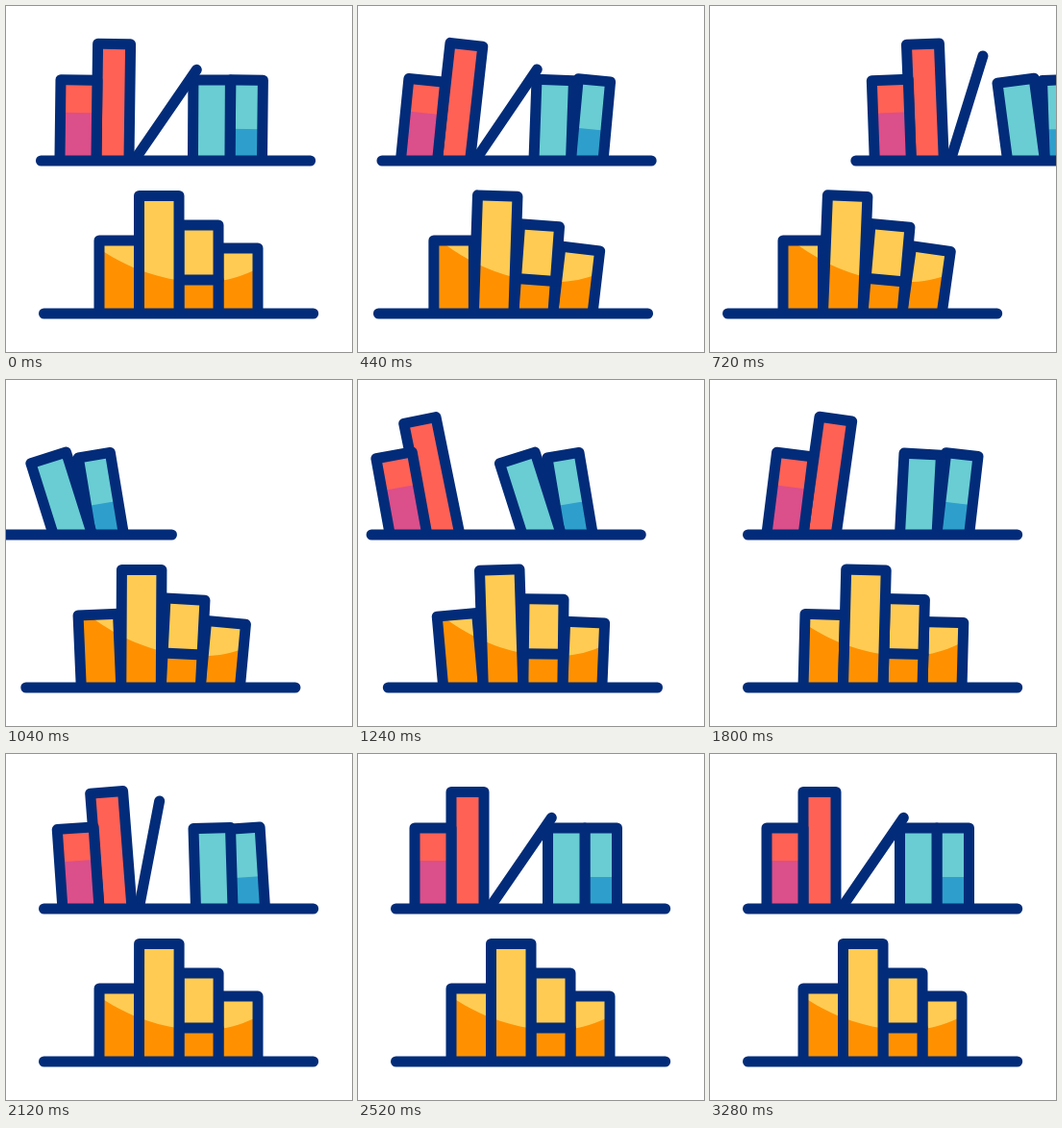
Animation of 360 by 360 pixels, one loop 3.72 s. Source, as an HTML page:

```html
<!DOCTYPE html>
<html lang="en">
<head>
<meta charset="utf-8">
<title>Bookshelves</title>
<style>
  html, body { margin: 0; width: 100%; height: 100%; overflow: hidden; background: #fff; }
  svg { display: block; width: 100%; height: 100%; }
</style>
</head>
<body>
<svg id="stage" viewBox="0 0 360 360"></svg>
<script>
const LOOP = 3720, STEP = 40, STOP = 1480;
const NAVY = '#022c79', RED = '#ff6155', PINK = '#db4f8a', TEAL = '#69cdd3',
      BLUE = '#2e9fcc', YELLOW = '#ffcb52', ORANGE = '#ff9100';
const SHADE = 'M60 222 L88 246 C110 263 150 286 200 287 C225 288 245 283 272 268 V340 H60 Z';

const stage = document.getElementById('stage');

function add(parent, tag, attrs = {}) {
  const node = document.createElementNS('http://www.w3.org/2000/svg', tag);
  for (const key in attrs) node.setAttribute(key, attrs[key]);
  return parent.appendChild(node);
}

// Progress from 0 to 1 between two times, and its sine-eased form.
const progress = (t, from, to) => Math.min(1, Math.max(0, (t - from) / (to - from)));
const ease = (t, from, to) => (1 - Math.cos(Math.PI * progress(t, from, to))) / 2;
const mix = (a, b, u) => a + (b - a) * u;

function makeShelf(name, base) {
  const group = add(stage, 'g', { fill: 'none', stroke: NAVY, 'stroke-width': 11,
    'stroke-linecap': 'round', 'stroke-linejoin': 'round' });
  const clip = add(group, 'clipPath', { id: name });
  add(clip, 'rect', { x: -400, y: 0, width: 1200, height: base });
  const books = add(group, 'g', { 'clip-path': `url(#${name})` });
  add(group, 'path', { d: `M39.5 ${base}H319.7` });
  return { name, base, group, books };
}

// A book tilts around the middle of its foot; whatever dips below the shelf is clipped.
function makeBook(shelf, { left, right, top, fill, shade, shadeTop, band, tilt }) {
  const box = { x: left, y: top, width: right - left, height: shelf.base - top + 30 };
  const body = add(shelf.books, 'g', { stroke: 'none' });
  add(body, 'rect', { ...box, fill });
  const turning = [body];
  let fixedShade = null;
  if (shadeTop) {
    add(body, 'rect', { ...box, y: shadeTop, fill: shade });
  } else if (shade) {
    const id = `${shelf.name}-${left}`;
    turning.push(add(add(shelf.group, 'clipPath', { id }), 'rect', box));
    const holder = add(shelf.books, 'g', { 'clip-path': `url(#${id})`, stroke: 'none' });
    fixedShade = add(holder, 'path', { d: SHADE, fill: shade });
  }
  const outline = add(shelf.books, 'g');
  turning.push(outline);
  add(outline, 'rect', box);
  if (band) add(outline, 'path', { d: `M${left} ${band}H${right}` });

  return (t, shift) => {
    const turn = `rotate(${tilt(t)} ${(left + right) / 2} ${shelf.base})`;
    turning.forEach(node => node.setAttribute('transform', turn));
    if (fixedShade) fixedShade.setAttribute('transform', `translate(${-shift} 0)`);
  };
}

// Lag while the shelf is thrown across, then a swing that dies out after the stop.
const thrown = (lean, bounce = 1) => t => {
  if (t < STOP) {
    const windUp = -0.6 * bounce * ease(t, -100, 360);
    return lean * mix(windUp, 1, ease(t, 360, 1080));
  }
  const since = t - STOP;
  const swing = Math.cos(Math.PI * since / 320) * (1 - progress(since, 0, 1040));
  return lean * swing * (since > 160 ? bounce : 1);
};

// Lean one way as the shelf backs off, the other as it returns, then a small rebound.
const nudged = (away, back) => t => {
  const rebound = 1.5 * (1 - ease(t, 1800, 2160));
  const lean = mix(away * ease(t, 0, 600), back, ease(t, 720, STOP));
  return mix(lean, rebound, ease(t, STOP, 1800));
};

const upper = makeShelf('upper', 161);
const lower = makeShelf('lower', 320);
const stick = add(upper.books, 'path');

const upperBooks = [
  { left: 97, right: 131, top: 39.5, fill: RED, tilt: thrown(-11.5) },
  { left: 59, right: 97, top: 77, fill: RED, shade: PINK, shadeTop: 111, tilt: thrown(-10.3) },
  { left: 236, right: 269.5, top: 77, fill: TEAL, shade: BLUE, shadeTop: 128, tilt: thrown(-9.5) },
  { left: 197.5, right: 236, top: 77, fill: TEAL, tilt: thrown(-17.7, 0.25) }
].map(spec => makeBook(upper, spec));

const lowerBooks = [
  { left: 97, right: 138.5, top: 244, tilt: nudged(0, -6.5) },
  { left: 221, right: 262, top: 252, tilt: nudged(8, 0.7) },
  { left: 180, right: 221, top: 228, band: 285, tilt: nudged(5, -0.5) },
  { left: 138.5, right: 180, top: 197.5, tilt: nudged(2.3, -3) }
].map(spec => makeBook(lower, { fill: YELLOW, shade: ORANGE, ...spec }));

// The upper shelf leaves on the right and re-enters from the left.
function upperShift(t) {
  const start = 292, end = 1482, travel = 711, windUp = -20, settle = -1.5;
  if (t < start) return windUp * ease(t, -100, start);
  if (t >= end) return settle * (1 - ease(t, end, 1720));
  const u = progress(t, start, end);
  return u < 0.5 ? windUp + travel * 4 * u ** 3 : settle - travel * 4 * (1 - u) ** 3;
}

const lowerShift = t => -21 * (ease(t, 0, 580) - ease(t, 920, STOP));

// The loose book tips up during the throw, then drops out from behind the tall one.
function drawStick(t) {
  const leaving = t < 880;
  const fallen = leaving ? 1 - ease(t, 400, 1040) : progress(t, 1840, 2340) ** 2;
  const foot = leaving ? 139 : mix(126, 139, ease(t, 1840, 2040));
  const angle = 34.5 * fallen * Math.PI / 180;
  stick.setAttribute('visibility', leaving || t > 1840 ? 'visible' : 'hidden');
  stick.setAttribute('d', `M${foot} 157l${110 * Math.sin(angle)} ${-110 * Math.cos(angle)}`);
}

function poseShelf(shelf, books, shift, t) {
  shelf.group.setAttribute('transform', `translate(${shift} 0)`);
  books.forEach(pose => pose(t, shift));
}

function draw(t) {
  poseShelf(upper, upperBooks, upperShift(t), t);
  poseShelf(lower, lowerBooks, lowerShift(t), t);
  drawStick(t);
}

const start = performance.now();
function tick() {
  const t = (performance.now() - start) % LOOP;
  draw(Math.floor(t / STEP) * STEP);
  requestAnimationFrame(tick);
}
tick();
</script>
</body>
</html>
```
